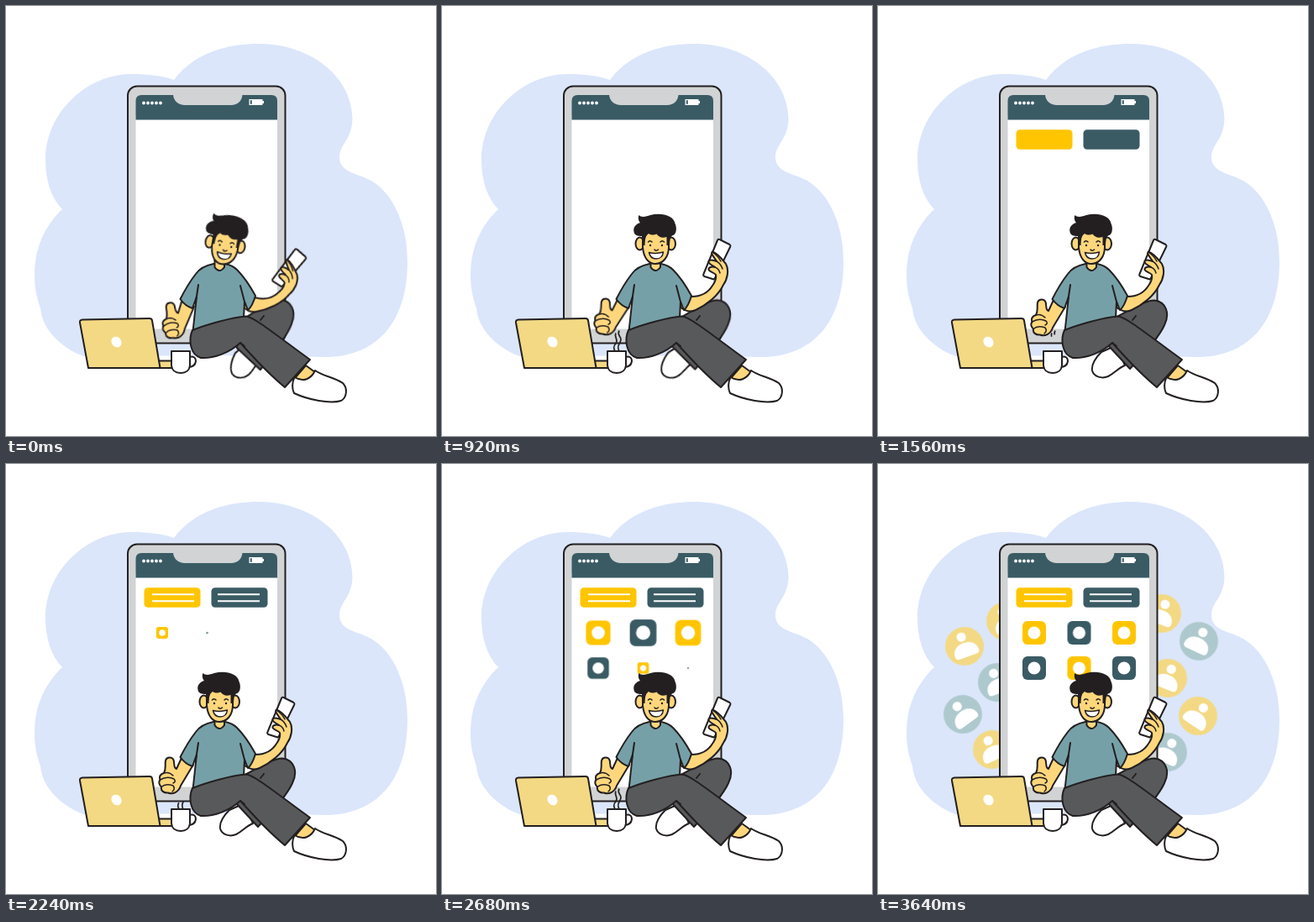
Animation, 512 px wide and 512 px high, one loop 4600 ms. Source, as an HTML page:

```html
<!DOCTYPE html>
<html lang="en">
<head>
<meta charset="utf-8">
<title>Social apps</title>
<style>
  html, body { margin: 0; height: 100%; overflow: hidden; background: #fff; }
  svg { display: block; width: 100vw; height: 100vh; }

  .ink { stroke: #231f20; stroke-width: 2; stroke-linejoin: round; stroke-linecap: round; }
  .line { fill: none; }
  .thin { stroke-width: 1.5; }
  .skin { fill: #fed77c; }
  .shirt { fill: #76a0a8; }
  .trousers { fill: #58595b; }
  .white { fill: #fff; }
  .gold { fill: #f3d983; }
  .mist { fill: #aec9cd; }
  .amber { fill: #ffc500; }
  .teal { fill: #3a5b64; }

  /* 1% of the loop is 46 ms */
  .head, .forearm, .leg, .shoe, .hand, .button, .rule, .steam, .icons, .icon, .avatar {
    animation: 4600ms linear infinite both;
  }
  .head { animation-name: head; transform-origin: 254px 322px; }
  .forearm { animation-name: forearm; transform-origin: 292px 347px; }
  .leg { animation-name: leg; transform-origin: 320px 350px; }
  .shoe { animation-name: shoe; transform-origin: 290px 425px; }
  .hand { animation-name: hand; transform-origin: 222px 350px; }
  .button { animation-name: button; }
  .rule { animation-name: rule; stroke: #fff; stroke-width: 2; stroke-dasharray: 1 2; }
  .steam { animation-name: steam; stroke-linecap: butt; stroke-width: 1.7; stroke-dasharray: 1 2; }
  .icons { animation-name: gate; }
  .icon { animation-name: icon; animation-delay: calc(var(--i) * 111ms); }
  .avatar { animation-name: avatar; }

  @keyframes head {
    0%, 1.74% { transform: rotate(10deg); animation-timing-function: ease-in-out; }
    13.9%, 100% { transform: none; }
  }
  @keyframes forearm {
    0%, 1.74% { transform: rotate(14.5deg); animation-timing-function: ease-in-out; }
    13.9%, 100% { transform: none; }
  }
  @keyframes leg {
    0%, 13.9% { transform: translateX(-3px) rotate(-4deg); animation-timing-function: ease-in-out; }
    26.1%, 100% { transform: none; }
  }
  @keyframes shoe {
    0%, 13.9% { transform: translate(8px, -8px) rotate(-14deg); animation-timing-function: ease-in-out; }
    26.1%, 100% { transform: none; }
  }
  @keyframes hand {
    0%, 13.9% { transform: rotate(-8deg); animation-timing-function: ease-in-out; }
    20% { transform: rotate(2deg); animation-timing-function: ease-in-out; }
    26.1%, 100% { transform: none; }
  }
  @keyframes button {
    0%, 24.6% { transform: scale(0); animation-timing-function: ease-out; }
    30.4% { transform: scale(1.09); animation-timing-function: ease-in-out; }
    33.9%, 100% { transform: none; }
  }
  @keyframes rule {
    0%, 39.5% { stroke-dashoffset: 1.02; animation-timing-function: ease-in-out; }
    47.8%, 100% { stroke-dashoffset: 0; }
  }
  @keyframes steam {
    0%, 1.74% { stroke-dashoffset: 1.02; }
    18.3%, 20.9% { stroke-dashoffset: 0; }
    37.4% { stroke-dashoffset: -1.02; }
    37.41%, 43.5% { stroke-dashoffset: 1.02; }
    57.4%, 61% { stroke-dashoffset: 0; }
    79.1%, 100% { stroke-dashoffset: -1.02; }
  }
  /* keeps delayed icons hidden while their previous cycle runs out */
  @keyframes gate {
    0%, 44.5% { visibility: hidden; }
    44.51%, 100% { visibility: visible; }
  }
  @keyframes icon {
    0%, 45.87% { transform: scale(0); }
    51.1% { transform: scale(.92); animation-timing-function: ease-out; }
    55% { transform: scale(1.14); animation-timing-function: ease-in-out; }
    60.2%, 100% { transform: none; }
  }
  @keyframes avatar {
    0%, 64.3% { transform: translateX(var(--dx)); animation-timing-function: ease-in-out; }
    76.1%, 100% { transform: none; }
  }
</style>
</head>
<body>
<svg viewBox="0 0 512 512">
  <path fill="#dbe6fb" d="M200 88C222 58 260 45 300 45C365 45 412 86 412.500 134C412 160 397 164 397 180C397 198 418 199 435 208C462 224 478 262 478 305C478 378 440 418 380 418C365 418 352 417 340 416L92 417C64 406 43 384 41 360C36 345 34 335 34 320C34 288 46 262 67 242C53 228 47 206 47 183C47 128 95 81 150 81C168 81 186 83 200 88Z"/>

  <g id="avatars"></g>

  <!-- phone -->
  <rect class="ink" x="145" y="95.500" width="187.500" height="306" rx="11" fill="#d1d3d4"/>
  <path class="white" d="M154.500 130H323V384.500H154.500Z"/>
  <path class="teal" d="M154.500 135.500V113Q154.500 106 161.500 106H316Q323 106 323 113V135.500Z"/>
  <path fill="#d1d3d4" d="M199 105.500H281.500C281 113 276 118 268 118H213C205 118 199.500 113 199 105.500Z"/>
  <path d="M164 115.500H185" stroke="#fff" stroke-width="3.800" stroke-linecap="round" stroke-dasharray="0 5" fill="none"/>
  <path class="white" d="M289.500 111H305.500V113H307V116H305.500V118H289.500Z"/>
  <path class="teal" d="M290.800 112.200H292.800V116.800H290.800Z"/>

  <g id="buttons"></g>
  <g id="icons" class="icons"></g>

  <!-- far leg -->
  <g class="leg ink">
    <path class="shoe white" d="M266 412C260 418 254 427 255 434C257 442 267 444 274 441C282 437 286 431 294 428L284 404Z"/>
    <path class="trousers" d="M276 374C294 367 313 351 329 350.500C343 352 348 366 341 380C335 394 317 414 300 432L274 404Z"/>
  </g>

  <!-- raised arm -->
  <g class="forearm ink">
    <path class="white" d="M330.500 278L342.500 284Q344 285 343.300 286.500L325 324Q324 326 322 325L312.500 322Q310.500 321 311.500 319L328 279Q329 277 330.500 278Z"/>
    <path class="skin" d="M283 358C289 363 296 365 302 362C315 356 329 345 335 332C340 325 342 314 338 307C334 302 329 295 322 292.500C319 295 325 300 327 304C323 303 319 301 317.500 304C317 307 322 309 325 311C321 310 317 311 317.500 314C319 317 324 317 326 320C327 325 325 329 322 333C317 341 309 346 297 346Z"/>
    <path class="line thin" d="M327 304Q332 307 334 313M325 311Q330 313 331 318M322 293Q329 298 332 304"/>
  </g>

  <!-- thumbs up -->
  <g class="hand ink">
    <path class="skin" d="M209 350L203 363C199 362 201 356 199.500 352.500C198 348.500 191.500 348.500 190 353C189 358 191 363 188 368C184 369 182 372 183.500 376C181 379 183 383 185 384.500C184 389 188 392 193 391.500C199 394 206 390 208 383L223 358Z"/>
    <path class="line thin" d="M188 368Q194 366 199 371M183.500 376Q192 371 200 375Q203 378 199 380M185 384.500Q190 380 199 383Q202 387 198 390"/>
  </g>

  <!-- torso -->
  <path class="ink shirt" d="M247 307C237 309 231 312 226 319C219 328 212 340 207.500 349C211 354 216 358 222 360L227 346L222 392H282L284 352L288 362C293 358 295 352 297 345C291 334 283 322 275 314C271 310 266 308 261 307Z"/>
  <path class="ink line" d="M229 332L226.500 349M279 333L285 356"/>
  <path class="ink skin" d="M248.500 302V311Q254 319 260 311V302Z"/>

  <g class="head">
    <ellipse class="ink skin" cx="235.500" cy="283" rx="5" ry="7.500"/>
    <ellipse class="ink skin" cx="273" cy="283" rx="5" ry="7.500"/>
    <path class="ink skin" d="M239 268V287C240 300 246 307 254 307C263 307 270 299 270 287V268Z"/>
    <path fill="#231f20" d="M228.500 269C227 263 232 259 236 258C234 256 233 252 234.500 249C237 252 243 251 248 249C262 245.500 276 250 277.500 259C280 264 279 272 275 273C272 274 271.500 277 271 285H267.500V275C262 277 258 275 255.500 271.500C253 273 249 273 246 271C242 274 242 277 241.500 285H238V274C233 274 229 273 228.500 269Z"/>
    <path class="ink line thin" d="M245.500 281Q248 278.500 250 281M260 281Q262.500 278.500 264.500 281M253 290Q255 292.500 257.500 290"/>
    <circle cx="248" cy="285" r="1.200" fill="#231f20"/>
    <circle cx="262" cy="285" r="1.200" fill="#231f20"/>
    <path class="ink white thin" d="M246.500 293.500Q255 295.500 263.500 293Q262.500 301 255 301Q248 301 246.500 293.500Z"/>
  </g>

  <!-- near leg -->
  <path class="ink skin" d="M344 443L357 428L368 436Q364 447 350 445Z"/>
  <path class="ink white" d="M343.500 442C355 449 364 443 368 434C378 441 391 442 401 449C407 455 406 466 399 470C386 474 360 469 343 461C340 455 341 447 343.500 442Z"/>
  <path class="ink trousers" d="M222 386C239 379 268 371 286 369.500C296 370 332 400 362 421L332 454C314 439 295 419 279 401C266 413 247 420 232 419C219 415 217 397 222 386Z"/>
  <path class="ink line" d="M279 401L284 405M303 374L307 369"/>

  <!-- laptop -->
  <path class="ink gold" d="M180 422.500H200V431H180Z"/>
  <path class="ink gold" d="M91 373.500L171 372Q173.500 372 174 374.500L183.500 431H98L88 377Q87.500 373.700 91 373.500Z"/>
  <ellipse class="white" cx="131.500" cy="400" rx="5.700" ry="6.700" transform="rotate(-40 131.500 400)"/>

  <!-- cup -->
  <path class="ink line steam" pathLength="1" d="M206 411C202 404 208 403 208 399C208 395 205 393 207 389.500"/>
  <path class="ink line steam" pathLength="1" d="M211 411C207 404 213 402 213 397C213 393 208 392 211 386.500"/>
  <path class="ink white" d="M218 418Q226 416 226 423Q225 430 217 430Z"/>
  <path class="ink white" d="M197 411H219V428Q218 437 208 437Q198 437 197 428Z"/>
</svg>

<script>
  const fill = (id, items, draw) => {
    document.getElementById(id).innerHTML = items.map(draw).join('');
  };

  fill('buttons', [[198, 'amber', 174, 224], [278, 'teal', 252, 302]], ([x, tone, from, to]) => `
    <g transform="translate(${x} 159)">
      <rect class="button ${tone}" x="-33.5" y="-11.7" width="67" height="23.4" rx="4.5"/>
    </g>
    ${[155.3, 163.3].map(y => `<path class="rule" pathLength="1" d="M${from} ${y}H${to}"/>`).join('')}`);

  // each app mark is a plain disc
  const tones = ['amber', 'teal', 'amber', 'teal', 'amber', 'teal'];
  fill('icons', tones, (tone, i) => `
    <g transform="translate(${186 + i % 3 * 53.5} ${i < 3 ? 201 : 243})">
      <g class="icon" style="--i:${i}">
        <rect class="${tone}" x="-14" y="-14" width="28" height="28" rx="6"/>
        <circle class="white" r="7.5"/>
      </g>
    </g>`);

  const people = [
    [152, 187, 'gold', -20], [103, 217, 'gold', -20], [142, 260, 'mist', -22],
    [101, 298, 'mist', -36], [136, 340, 'gold', -25],
    [338, 178, 'gold', 20], [382, 211, 'mist', 25], [345, 255, 'gold', 22],
    [381, 300, 'gold', 34], [345, 343, 'mist', 25]
  ];
  fill('avatars', people, ([x, y, tone, tilt]) => `
    <g class="avatar" style="--dx:${(x < 240 ? 172 : 306) - x}px">
      <g transform="translate(${x} ${y}) rotate(${tilt})">
        <circle class="${tone}" r="23"/>
        <circle class="white" cy="-11.5" r="5.5"/>
        <path class="white" d="M-15 9C-15 0-8-4 0-4S15 0 15 9Q15 13 10 13H-10Q-15 13-15 9Z"/>
      </g>
    </g>`);
</script>
</body>
</html>
```
